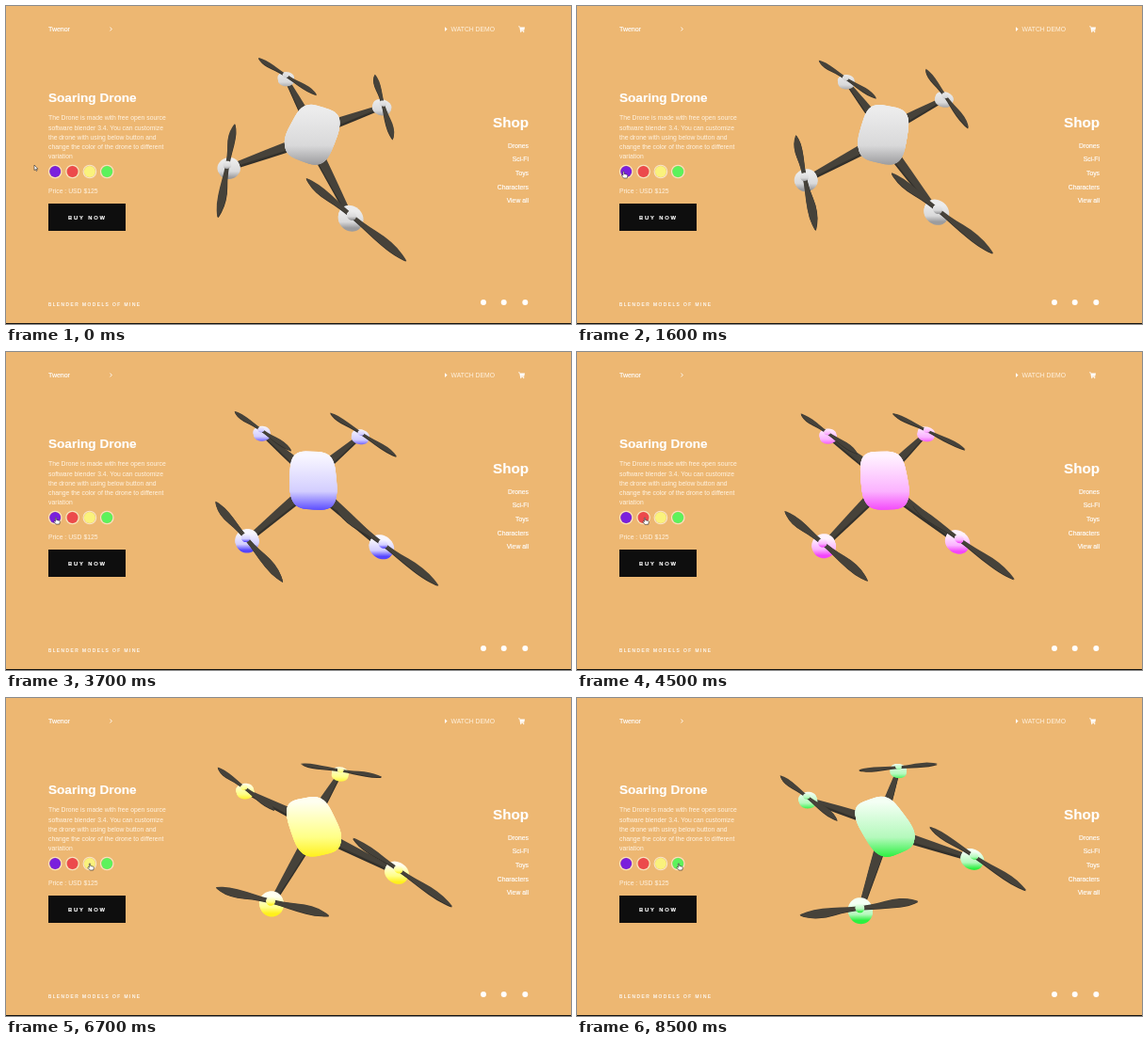
Recreate the animation shown at these times as an HTML page with a canvas. Size 600 px wide and 338 px high, loop 8600 ms.

```html
<!DOCTYPE html>
<html lang="en">
<head>
<meta charset="utf-8">
<title>Drone shop</title>
<style>
  html, body { margin: 0; width: 100%; height: 100%; overflow: hidden; background: #edb772; }
  svg, canvas { position: absolute; left: 0; top: 0; width: 600px; height: 338px; }
  text { font-family: "Liberation Sans", Arial, sans-serif; font-size: 6.8px; fill: #fff; stroke: #fff; stroke-width: .15; }
  .bold { font-weight: bold; }
  .soft { fill: #fff3e2; stroke: none; }
  .end { text-anchor: end; }
</style>
</head>
<body>
<svg viewBox="0 0 600 338">
  <text x="45" y="27" style="font-size:7px">Twenor</text>
  <path d="M110.5 22.6l1.8 1.9-1.8 1.9" fill="none" stroke="#fff" stroke-width=".9"/>
  <path d="M466 22.3l2.6 2.3-2.6 2.3z" fill="#fff"/>
  <text class="end soft" x="519" y="27">WATCH DEMO</text>
  <g fill="#fff">
    <path d="M544 21.5h1.6l.4 1h5l-.7 3.2h-3.6l.1.6h3.4v.7h-4.1l-.8-4.7H544z"/>
    <circle cx="546.8" cy="27.6" r=".7"/><circle cx="549.7" cy="27.6" r=".7"/>
    <circle cx="507" cy="315" r="3"/><circle cx="528.7" cy="315" r="3"/><circle cx="551.3" cy="315" r="3"/>
  </g>

  <text class="bold" x="45" y="102" style="font-size:13.6px">Soaring Drone</text>
  <g id="about"></g>
  <g id="swatches"></g>
  <text class="soft" x="45" y="199.3">Price : USD $125</text>
  <rect x="45" y="210" width="82" height="29" fill="#0e0e0e"/>
  <text class="bold" x="66" y="226.6" style="font-size:5.8px;letter-spacing:1.85px">BUY NOW</text>

  <text class="bold end" x="555" y="128.6" style="font-size:15.2px">Shop</text>
  <g id="menu"></g>
  <text x="45" y="318.7" style="font-size:4.8px;letter-spacing:1.5px">BLENDER MODELS OF MINE</text>
  <rect y="337" width="600" height="1" fill="#151310"/>
</svg>
<canvas id="stage"></canvas>
<script>
const byId = id => document.getElementById(id);
const textLines = (lines, x, y, step, cls) => lines.map((line, i) =>
  `<text class="${cls}" x="${x}" y="${y + i * step}">${line}</text>`).join('');

byId('about').innerHTML = textLines([
  'The Drone is made with free open source',
  'software blender 3.4. You can customize',
  'the drone with using below button and',
  'change the color of the drone to different',
  'variation'], 45, 121.3, 10.25, 'soft');
byId('menu').innerHTML = textLines(
  ['Drones', 'Sci-Fi', 'Toys', 'Characters', 'View all'], 555, 150.6, 14.65, 'end');
byId('swatches').innerHTML = ['#7a20dc', '#ec4a4c', '#faf27c', '#5df25c'].map((color, i) => {
  const x = 52.2 + i * 18.35;
  return `<circle cx="${x}" cy="176" r="6" fill="${color}"/>
    <circle cx="${x}" cy="176" r="6.8" fill="none" stroke="#f8e4c6" stroke-width="1.1"/>`;
}).join('');

const LOOP = 8600, STEP = 100, RAD = Math.PI / 180;
const DARK = '#302e2a', GRAPHITE = '#46423a';
const canvas = byId('stage'), ctx = canvas.getContext('2d');
const ratio = window.devicePixelRatio || 1;
canvas.width = 600 * ratio;
canvas.height = 338 * ratio;

// Paint: start time, highlight, middle tone, shade
const PAINTS = [
  [0, '#ececec', '#d9d9da', '#9c9c9e'],
  [1900, '#f8f6ff', '#d3ceff', '#5546ff'],
  [4200, '#fff2ff', '#fbb2ff', '#f345fa'],
  [6400, '#fffff0', '#ffff86', '#fff01c'],
  [7700, '#f4fff4', '#b4f9bc', '#2cf041'],
];
// Pointer moves: start time, end time, x, y
const MOVES = [
  [300, 900, 49.5, 176],
  [3600, 4000, 72, 176.3],
  [5500, 5900, 89, 176],
  [7000, 7400, 108, 176],
];
// One propeller half: distance along, distance across (hub distance is 1)
const BLADE = [[.05, .018], [.17, .027], [.31, .052], [.44, .046], [.54, .01], [.54, 0],
  [.42, -.03], [.25, -.03], [.1, -.018]];
const PROPELLER = [...BLADE, ...BLADE.map(([l, w]) => [-l, -w])];

function project([x, y, z = 0]) {
  const depth = 1 + .205 * y - .273 * z;
  return [325 + (93.3 * x - 6.56 * y) / depth, 135 - (74.7 * y + 56 * z) / depth];
}
const polar = (r, deg) => [r * Math.cos(deg * RAD), r * Math.sin(deg * RAD)];

// Places flat points at an origin, turned by an angle, at height z
function place(points, [ox, oy], deg, z) {
  const [c, s] = polar(1, deg);
  return points.map(([x, y]) => [ox + x * c - y * s, oy + x * s + y * c, z]);
}

function fillShape(points, fill, smooth) {
  const p = points.map(project), n = p.length;
  ctx.beginPath();
  for (let i = 0; i < n; i++) {
    const [x, y] = p[i], [nx, ny] = p[(i + 1) % n];
    if (smooth) {
      if (!i) ctx.moveTo((p[n - 1][0] + x) / 2, (p[n - 1][1] + y) / 2);
      ctx.quadraticCurveTo(x, y, (x + nx) / 2, (y + ny) / 2);
    } else ctx.lineTo(x, y);
  }
  ctx.closePath();
  ctx.fillStyle = fill;
  ctx.fill();
}

function shade(top, bottom, [, light, middle, dark]) {
  const g = ctx.createLinearGradient(0, top, 0, bottom);
  g.addColorStop(.1, light);
  g.addColorStop(.68, middle);
  g.addColorStop(1, dark);
  return g;
}

const roundBox = (w, h, power) => Array.from({ length: 48 }, (_, i) => {
  const bend = v => Math.sign(v) * Math.abs(v) ** power;
  const [c, s] = polar(1, i * 7.5);
  return [w * bend(c), h * bend(s)];
});

function drawArm(from, to) {
  const dx = to[0] - from[0], dy = to[1] - from[1], len = Math.hypot(dx, dy);
  const outline = [[0, .052], [len * .35, .042], [len, .02], [len, -.02], [len * .35, -.042], [0, -.052]];
  const turn = Math.atan2(dy, dx) / RAD;
  [DARK, '#35332d', GRAPHITE].forEach((color, i) =>
    fillShape(place(outline, from, turn, -.06 + i * .025), color));
}

function drawBody(heading, paint) {
  const fill = shade(104, 169, paint);
  for (let i = -9; i <= 9; i++) {
    const s = i / 10, scale = (1 - s ** 4) ** .25;
    fillShape(place(roundBox(.37 * scale, .262 * scale, .58), [.01, 0], heading, .125 * s), fill);
  }
}

function drawRotor(hub, turn, paint) {
  const y = project(hub)[1], disc = roundBox(.112, .112, 1);
  const fill = shade(y - 8, y + 12, paint);
  for (let z = -.07; z < 0; z += .02) fillShape(place(disc, hub, 0, z), fill);
  fillShape(place(PROPELLER, hub, turn, .015), DARK, true);
  fillShape(place(PROPELLER, hub, turn, .03), GRAPHITE, true);
  const cap = shade(y - 7, y + 3, paint);
  for (let z = .02; z < .05; z += .01) fillShape(place(roundBox(.04, .04, 1), hub, 0, z), cap);
}

function drawDrone(t) {
  const paint = PAINTS.filter(p => p[0] <= t).pop();
  const seconds = t / 1000, heading = 66.2 + 5.69 * seconds;
  const still = -44.5, spinning = -92.5 + 11.6 * seconds;
  // Arm offset from the heading, body corner offset, propeller angle
  const rotors = [[40.65, 36, still], [-40.65, -36, spinning],
    [139.35, 144, spinning], [220.65, 216, still]]
    .map(([arm, corner, turn]) => ({
      hub: polar(1, heading + arm), root: polar(.34, heading + corner), turn,
    }));
  rotors.forEach(r => drawArm(r.root, r.hub));
  drawBody(heading, paint);
  rotors.forEach(r => drawRotor(r.hub, r.turn, paint));
}

function drawPointer(t) {
  let x = 30, y = 169;
  for (const [start, end, tx, ty] of MOVES) {
    const k = Math.min(1, Math.max(0, (t - start) / (end - start)));
    const ease = k * k * (3 - 2 * k);
    x += (tx - x) * ease;
    y += (ty - y) * ease;
  }
  const shape = x < 45
    ? 'M0 0v5.6l1.3-1.1.9 1.9.9-.4-.9-1.9h1.7z'
    : 'M-.6 0q.7-.6 1.2.2v2.2l3 .8q.8.3.7 1.2l-.6 2.6h-3.6l-2.2-2.6q0-1 .9-.7l.6.5z';
  ctx.save();
  ctx.translate(x, y);
  const path = new Path2D(shape);
  ctx.fillStyle = '#fff';
  ctx.strokeStyle = '#2b2826';
  ctx.lineWidth = .6;
  ctx.fill(path);
  ctx.stroke(path);
  ctx.restore();
}

function frame() {
  const t = Math.floor(performance.now() % LOOP / STEP) * STEP;
  ctx.setTransform(ratio, 0, 0, ratio, 0, 0);
  ctx.clearRect(0, 0, 600, 338);
  drawDrone(t);
  drawPointer(t);
  requestAnimationFrame(frame);
}
frame();
</script>
</body>
</html>
```
